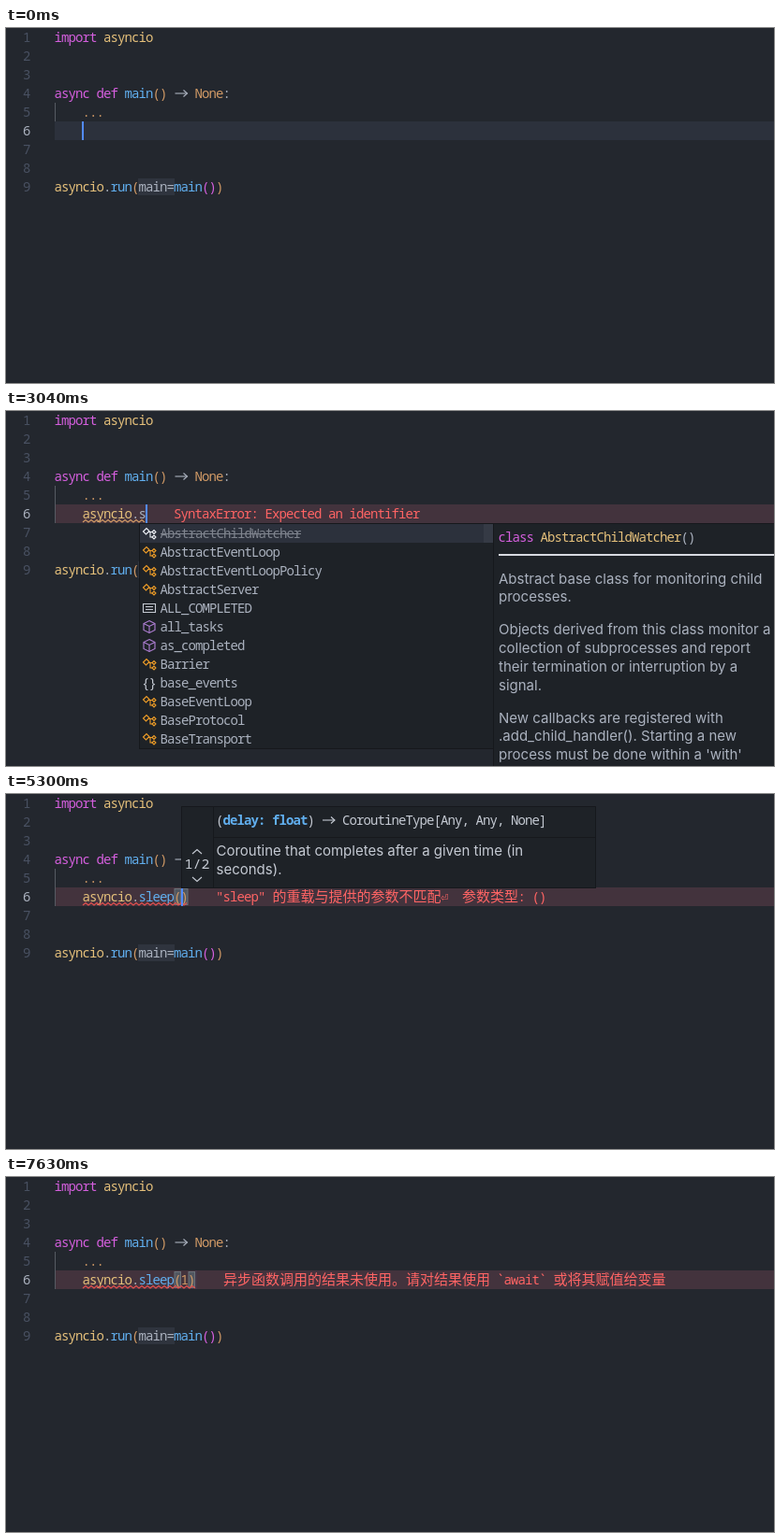
Animation, 820 px wide and 380 px high, one loop 7.99 s. Source, as an HTML page with a canvas:

```html
<!DOCTYPE html>
<html lang="zh">
<head>
<meta charset="utf-8">
<title>Editor completion</title>
<style>
html, body { margin: 0; width: 100%; height: 100%; overflow: hidden; background: #23272e; }
canvas { display: block; }
</style>
</head>
<body>
<canvas id="stage" width="820" height="380"></canvas>
<script>
const ctx = document.getElementById('stage').getContext('2d');
const LOOP = 7990, CELL = 7.5, LEFT = 52, CODE = 82;
const MONO = '"Noto Sans Mono", "DejaVu Sans Mono", "Noto Sans CJK SC", monospace';
const CJK = '"Noto Sans CJK SC", "Noto Sans CJK", sans-serif';
const C = {
  bg: '#23272e', line: '#2c313c', error: '#43333d', panel: '#1e2227', edge: '#16181c',
  fg: '#abb2bf', dim: '#7f848e', num: '#495162', white: '#eceff4', pink: '#d55fde',
  blue: '#61afef', orange: '#d19a66', yellow: '#e5c07b', cyan: '#46b4c3', violet: '#b180d7',
  red: '#ff6464', squiggle: '#e4504f', classy: '#ee9d28', cursor: '#528bff'
};

// [time, text on line 6, cursor column]
const TYPING = [
  [-35, '', 0], [1130, 'a', 1], [1250, 'as', 2], [1540, 'asy', 3], [2400, 'asyncio', 7],
  [2600, 'asyncio.', 8], [3040, 'asyncio.s', 9], [3210, 'asyncio.sl', 10],
  [4210, 'asyncio.sleep', 13], [5050, 'asyncio.sleep()', 14],
  [5960, 'asyncio.sleep(1)', 15], [6860, 'asyncio.sleep(1)', 16]
];
// [time, message, squiggle start, squiggle end, squiggle colour]
const ERRORS = [
  [0, ''], [1330, '"as" 未定义', 0, 3, C.squiggle], [1850, '"asy" 未定义', 0, 3, C.squiggle],
  [2850, 'SyntaxError: Expected an identifier', 0, 9, C.orange],
  [3450, '"sl" 不是 "asyncio" 模块的已知属性', 8, 10, C.squiggle], [4530, ''],
  [5280, '"sleep" 的重载与提供的参数不匹配⏎  参数类型: ()', 0, 16, C.squiggle],
  [6250, '异步函数调用的结果未使用。请对结果使用 `await` 或将其赋值给变量', 0, 16, C.squiggle]
];

// Items: icon, label (* toggles bold, ~ means deprecated), origin
const parseItems = s => s.trim().split('\n').map(l => l.trim().split(' '));
const NAMES = parseItems(`
  module *asy*ncio
  keyword *asy*nc
  module *asy*nc_case unittest
  cube *asy*nccontextmanager contextlib
  class *Asy*ncContextDecorator contextlib
  class *Asy*ncContextManager typing
  class *Asy*ncContextManager typing_extensions
  class *Asy*ncExitStack contextlib
  class *Asy*ncFor ast
  class *Asy*ncFunctionDef ast
  class *Asy*ncGenerator typing
  class *Asy*ncGenerator collections.abc`);
const MEMBERS = parseItems(`
  class ~AbstractChildWatcher
  class AbstractEventLoop
  class AbstractEventLoopPolicy
  class AbstractServer
  constant ALL_COMPLETED
  cube all_tasks
  cube as_completed
  class Barrier
  module base_events
  class BaseEventLoop
  class BaseProtocol
  class BaseTransport`);
const MATCHES = parseItems(`
  cube *sl*eep
  cube *s*et_event_*l*oop
  cube *s*et_event_*l*oop_policy
  cube *s*hie*l*d
  cube ~set_child_watcher
  class *S*endfi*l*eNotAvailableError
  class ~SafeChildWatcher
  variable *S*electorEvent*L*oop
  class *S*ubprocessProtoco*l*
  class *S*treamReaderProtoco*l*`);

function at(list, t) {
  let hit = list[0];
  for (const entry of list) if (entry[0] <= t) hit = entry;
  return hit;
}

function rect(x, y, w, h, color) {
  ctx.fillStyle = color;
  ctx.fillRect(x, y, w, h);
}

function path(points, color, width = 1.1, close = false) {
  ctx.beginPath();
  points.forEach(([x, y]) => ctx.lineTo(x, y));
  if (close) ctx.closePath();
  ctx.strokeStyle = color;
  ctx.lineWidth = width;
  ctx.stroke();
}

function box(x, y, w, h) {
  rect(x, y, w, h, C.edge);
  rect(x + 1, y + 1, w - 2, h - 2, C.panel);
}

// Writes on the character grid; y is the middle of the row. Returns the end x.
function mono(str, x, y, color, style = '', scale = 1) {
  const cell = CELL * scale;
  ctx.textAlign = 'center';
  for (const ch of str) {
    const wide = ch > '\u2e7f';
    const w = wide || ch === '→' ? cell * 2 : cell;
    if (ch === '→') {
      path([[x + 1, y], [x + 14, y]], color);
      path([[x + 10, y - 3.5], [x + 14, y], [x + 10, y + 3.5]], color);
    } else if (ch !== ' ') {
      ctx.fillStyle = color;
      ctx.font = wide ? `15px ${CJK}` : `${style} ${14 * scale}px ${MONO}`;
      ctx.fillText(ch, x + w / 2, y + 5 * scale);
    }
    x += w;
  }
  return x;
}

// Alternating colour name and text.
function runs(x, y, ...parts) {
  for (let i = 0; i < parts.length; i += 2) x = mono(parts[i + 1], x, y, C[parts[i]]);
  return x;
}

function prose(lines, x, ys, color = C.fg) {
  ctx.font = '15px Inter, sans-serif';
  ctx.textAlign = 'left';
  ctx.fillStyle = color;
  lines.forEach((line, i) => ctx.fillText(line, x, ys[i] + 5));
}

function squiggle(from, to, color) {
  const points = [];
  for (let x = from, i = 0; x <= to; x += 3, i++) points.push([x, i % 2 ? 116.5 : 119]);
  path(points, color);
}

function icon(kind, x, y, selected) {
  const color = selected ? C.white
    : { cube: C.violet, class: C.classy, variable: '#75beff' }[kind] || '#c5cad3';
  const shape = (pts, close) => path(pts.map(([a, b]) => [x + a, y + b]), color, 1.1, close);
  if (kind === 'module') mono('{}', x - 7.5, y, color);
  if (kind === 'keyword') {
    for (const [a, b, dy] of [[-7, 0, -5], [2, 7, -5], [-7, -2, -1], [1, 5, -1], [-7, 3, 2], [-7, 7, 5]])
      shape([[a, dy], [b, dy]]);
  }
  if (kind === 'cube') {
    shape([[0, -6.5], [6, -3.5], [6, 3.5], [0, 6.5], [-6, 3.5], [-6, -3.5]], true);
    shape([[-6, -3.5], [0, -.5], [6, -3.5]]);
    shape([[0, -.5], [0, 6.5]]);
  }
  if (kind === 'class') {
    shape([[-6.5, -2], [-3, -5.5], [0, -2.5], [-3.5, 1]], true);
    shape([[-1, -1.5], [3.5, -1.5]]);
    shape([[1, -1.5], [1, 4], [3.5, 4]]);
    for (const dy of [-1.5, 4]) shape([[3, dy], [5, dy - 2], [7, dy], [5, dy + 2]], true);
  }
  if (kind === 'constant') {
    shape([[-6.5, -4.5], [6.5, -4.5], [6.5, 4.5], [-6.5, 4.5]], true);
    for (const dy of [-1.5, 1.5]) shape([[-4, dy], [4, dy]]);
  }
  if (kind === 'variable') {
    for (const s of [-1, 1]) shape([[4 * s, -5], [6.5 * s, -5], [6.5 * s, 5], [4 * s, 5]]);
    shape([[-3.5, -.5], [1, -3], [3.5, -1.5], [3.5, 1], [-1, 3], [-3.5, 1.5]], true);
    shape([[-3.5, -.5], [-.5, .5], [3.5, -1.5]]);
  }
}

function suggestions(items, left, thumb) {
  box(left - 1, 120, 379, items.length * 20 + 2);
  rect(left, 121, thumb ? 367 : 377, 20, C.line);
  if (thumb) rect(left + 367, 121, 10, thumb, '#353a45');
  items.forEach(([kind, label, origin], i) => {
    const y = 131 + i * 20, old = label[0] === '~';
    icon(kind, left + 10, y, i === 0);
    let x = left + 22;
    label.replace('~', '').split('*').forEach((part, n) => {
      x = n % 2 ? mono(part, x, y, C.white, 'bold') : mono(part, x, y, old ? C.dim : C.fg);
    });
    if (old) rect(left + 22, y, x - left - 22, 1, C.dim);
    if (origin) mono(origin, left + 367 - origin.length * CELL * .85, y, C.dim, '', .85);
  });
}

function moduleDoc() {
  box(483, 120, 332, 74);
  runs(489, 135, 'fg', 'asyncio');
  path([[798, 130], [806, 138]], C.fg);
  path([[806, 130], [798, 138]], C.fg);
  rect(489, 153, 296, 2, '#d7dae0');
  prose(['The asyncio package, tracking PEP 3156.'], 489, [180]);
}

function watcherDoc() {
  box(520, 120, 340, 280);
  runs(526, 135, 'pink', 'class ', 'yellow', 'AbstractChildWatcher', 'fg', '()');
  rect(526, 153, 294, 2, '#d7dae0');
  prose(['Abstract base class for monitoring child', 'processes.',
    'Objects derived from this class monitor a', 'collection of subprocesses and report',
    'their termination or interruption by a', 'signal.',
    'New callbacks are registered with', '.add_child_handler(). Starting a new',
    "process must be done within a 'with'"],
    526, [180, 199, 234, 254, 274, 294, 329, 348, 368]);
}

function sleepDoc() {
  box(535, 120, 320, 195);
  let x = runs(541, 135, 'pink', 'def ', 'blue', 'sleep', 'fg', '(');
  x = mono('delay', x, 135, C.orange, 'italic');
  runs(x, 135, 'fg', ': ', 'cyan', 'float', 'fg', ') → CoroutineType[Any, Any, None]');
  runs(541, 175, 'pink', 'def ', 'blue', 'sleep', 'fg', '(');
  x = mono('delay', 571, 195, C.orange, 'italic');
  runs(x, 195, 'fg', ': ', 'cyan', 'float', 'fg', ',');
  x = mono('result', 571, 215, C.orange, 'italic');
  runs(x, 215, 'fg', ': _T', 'blue', '@', 'cyan', 'sleep');
  runs(541, 235, 'fg', ') → CoroutineType[Any, Any, _T', 'blue', '@', 'cyan', 'sleep', 'fg', ']');
  rect(541, 253, 279, 2, '#d7dae0');
  prose(['Coroutine that completes after a given', 'time (in seconds).'], 541, [280, 299]);
}

function signature(left) {
  box(left, 13, 443, 88);
  rect(left + 34, 14, 1, 86, C.edge);
  rect(left + 35, 46, 407, 1, C.edge);
  const mid = left + 17;
  path([[mid - 5, 64], [mid, 59.5], [mid + 5, 64]], '#c5cad3');
  path([[mid - 5, 89], [mid, 93.5], [mid + 5, 89]], '#c5cad3');
  ctx.font = `15px ${MONO}`;
  ctx.fillStyle = '#c5cad3';
  ctx.textAlign = 'center';
  ctx.fillText('1/2', mid, 80);
  let x = mono('(', left + 37.5, 28, '#c5cad3');
  x = mono('delay: float', x, 28, C.blue, 'bold');
  mono(') → CoroutineType[Any, Any, None]', x, 28, '#c5cad3');
  prose(['Coroutine that completes after a given time (in', 'seconds).'],
    left + 37.5, [61, 81], '#c5cad3');
}

function bulb() {
  ctx.fillStyle = '#ffcc00';
  ctx.beginPath();
  ctx.arc(60.5, 106, 4.7, 0, Math.PI * 2);
  ctx.fill();
  rect(58.5, 109, 4, 2.5, '#ffcc00');
  rect(58.5, 112.5, 4, 2, '#ffcc00');
}

function cursorOpacity(idle) {
  if (idle < 500) return 1;
  let p = (idle - 500) % 1000;
  if (p > 500) p = 1000 - p;
  const k = Math.min(1, Math.max(0, (p - 100) / 200));
  return 1 - k * k * (3 - 2 * k);
}

function editedLine(text) {
  const [, head, dot, name, call] = text.match(/^([a-z]*)(\.?)([a-z]*)(.*)$/);
  const x = runs(CODE, 110, head === 'asyncio' ? 'yellow' : 'fg', head, 'fg', dot,
    name === 'sleep' ? 'blue' : 'fg', name);
  if (call) {
    for (const bx of [x, x + (call.length - 1) * CELL]) {
      rect(bx, 101, CELL, 18, '#6b7178');
      rect(bx + 1, 102, CELL - 2, 16, '#515760');
    }
    runs(x, 110, 'orange', call);
  }
}

function draw(t) {
  const [keyTime, text, column] = at(TYPING, t);
  const [, message, from, to, waveColor] = at(ERRORS, t);
  const caret = CODE + column * CELL;

  rect(0, 0, 820, 380, C.bg);
  rect(LEFT, 100, 768, 20, message ? C.error : C.line);
  rect(LEFT, 80, 1, text ? 40 : 20, '#565b63');
  for (let n = 1; n <= 9; n++) mono(String(n), 18.5, n * 20 - 10, n === 6 ? C.fg : C.num);

  runs(LEFT, 10, 'pink', 'import ', 'yellow', 'asyncio');
  runs(LEFT, 70, 'pink', 'async def ', 'blue', 'main', 'orange', '()', 'fg', ' → ',
    'orange', 'None', 'fg', ':');
  runs(CODE, 90, 'orange', '...');
  rect(141, 161, 39, 18, '#2f343e');
  runs(LEFT, 170, 'yellow', 'asyncio', 'fg', '.', 'blue', 'run', 'orange', '(',
    'fg', 'main=', 'blue', 'main', 'pink', '()', 'orange', ')');

  editedLine(text);
  if (message) {
    const end = CODE + text.length * CELL;
    squiggle(CODE + from * CELL, Math.min(end, CODE + to * CELL), waveColor);
    mono(message, end + 30, 110, C.red);
  }
  if (t >= 1670 && t < 2400) bulb();

  ctx.globalAlpha = cursorOpacity(t - keyTime);
  rect(Math.floor(caret) - (column ? 0 : 1), 100, 2, 20, C.cursor);
  ctx.globalAlpha = 1;

  if (t >= 1610 && t < 2400) {
    suggestions(NAMES, 106, 96);
    if (t >= 1670) moduleDoc();
  } else if (t >= 2780 && t < 3110) {
    suggestions(MEMBERS, 143, 20);
    if (t >= 2900) watcherDoc();
  } else if (t >= 3110 && t < 4210) {
    suggestions(MATCHES, t < 3250 ? 151 : 158);
    if (t >= 3320) sleepDoc();
  } else if (t >= 5110 && t < 6900) {
    signature(t < 5980 ? 187 : 194.5);
  }
}

function frame(now) {
  draw(now % LOOP);
  requestAnimationFrame(frame);
}
requestAnimationFrame(frame);
</script>
</body>
</html>
```
